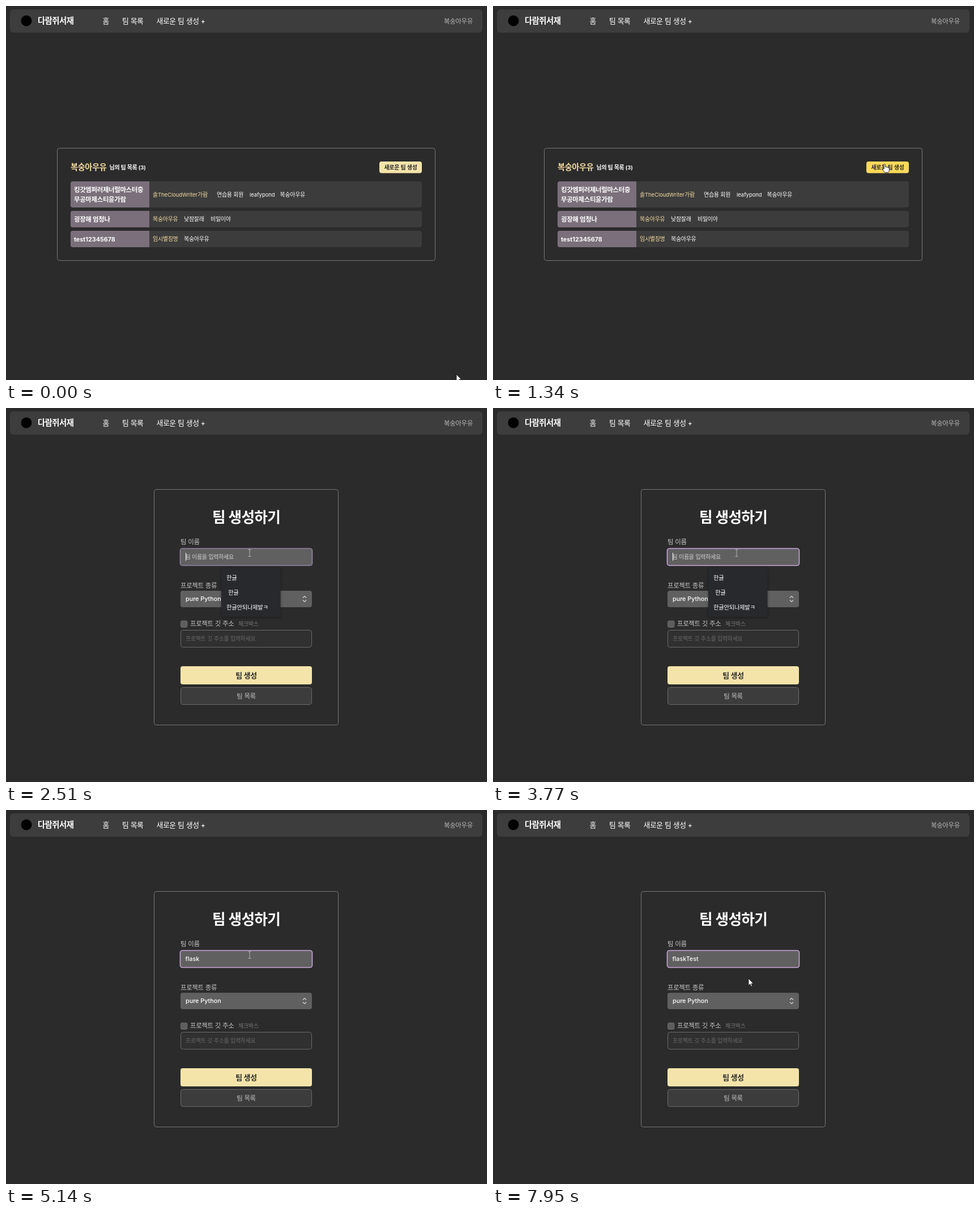
These frames come from a looping animation (849 by 659 pixels, 8 s). An HTML page:

```html
<!DOCTYPE html>
<html lang="ko">
<head>
<meta charset="utf-8">
<title>팀 생성</title>
<style>
  html, body { margin: 0; width: 100%; height: 100%; overflow: hidden; background: #2b2b2b; }
  svg { display: block; width: 849px; height: 659px; }
  text { white-space: pre; font-family: Inter, "Noto Sans CJK KR", "Noto Sans CJK", sans-serif; }
  .ko { font-family: "Noto Sans CJK KR", "Noto Sans CJK", sans-serif; letter-spacing: -.03em; }
</style>
</head>
<body>
<svg id="stage" viewBox="0 0 849 659"></svg>
<script>
const LOOP = 8000;
const S = 10.3, M = 11.8, L = 13.25, XL = 14.7;
const BG = '#2b2b2b', GREY = '#3c3c3c', CREAM = '#f5e4a9', GOLD = '#f5dca0', FIELD = '#606060';
const USER = '복숭아우유';

// Hangul and Latin runs have their own optical size.
const runs = (str, size) => str.replace(/[가-힣ㄱ-ㅎ]+|[^가-힣ㄱ-ㅎ]+/g, run =>
  /[가-힣ㄱ-ㅎ]/.test(run)
    ? `<tspan class="ko" font-size="${size * .97}">${run}</tspan>`
    : `<tspan font-size="${size * .915}">${run}</tspan>`);

// cy is the optical middle of the line.
const text = (x, cy, size, str, fill = '#fff', weight = 400, anchor = 'start') =>
  `<text x="${x}" y="${cy + size * .37}" fill="${fill}" font-weight="${weight}" text-anchor="${anchor}">${runs(str, size)}</text>`;

const box = (x, y, w, h, fill, extra = '') =>
  `<rect x="${x}" y="${y}" width="${w}" height="${h}" rx="4" fill="${fill}" ${extra}/>`;

const teamRow = (y, h, lines, members) =>
  box(114, y, 620, h, GREY) +
  `<path fill="#7a6f7b" d="M253 ${y}H118a4 4 0 0 0-4 4v${h - 8}a4 4 0 0 0 4 4H253z"/>` +
  lines.map((line, i) => text(120, y + h / 2 + (i - (lines.length - 1) / 2) * 17, M, line, '#fff', 700)).join('') +
  members.map(([x, name], i) => text(x, y + h / 2, S, name, i ? '#fff' : GOLD)).join('');

const header =
  box(7, 6, 834, 41, '#3d3d3d', 'style="rx:6px"') +
  '<circle cx="36" cy="26" r="9.5" fill="#000"/>' +
  text(56, 26, XL, '다람쥐서재', '#fff', 700) +
  text(170.5, 26, L, '홈', '#fff', 500) +
  text(205, 26, L, '팀 목록', '#fff', 500) +
  text(265.5, 26, L, '새로운 팀 생성 +', '#fff', 500) +
  text(773, 26.5, M, USER, '#b8b8b8');

const home =
  box(90.5, 250.5, 667, 198, 'none', 'stroke="#777"') +
  text(114, 284, XL, USER, GOLD, 700) +
  text(182.5, 284.5, S, '님의 팀 목록 (3)', '#fff', 700) +
  box(659, 274, 75, 20.5, CREAM, 'id="create"') +
  text(696.5, 284.5, S, '새로운 팀 생성', BG, 600, 'middle') +
  teamRow(309, 46, ['킹갓엠퍼러제너럴마스터충', '무공마제스티윤가람'],
    [[259, '솔TheCloudWriter가람'], [372, '연습용 회원'], [430, 'leafypond'], [483.5, USER]]) +
  teamRow(361, 29, ['굉장해 엄청나'], [[259, USER], [314, '낮잠잘래'], [361, '비밀이야']]) +
  teamRow(396, 29, ['test12345678'], [[259, '임시별칭명'], [314, USER]]);

const form =
  box(261.5, 143.5, 325, 415, 'none', 'stroke="#777"') +
  text(424, 192.5, 26.5, '팀 생성하기', '#fff', 700, 'middle') +
  text(308, 236, M, '팀 이름', '#c8c8c8') +
  box(308, 248, 232, 29, FIELD) +
  box(307.5, 247.5, 233, 30, 'none', 'id="ring" stroke-width="1.6"') +
  `<g id="hint">${text(316.5, 262.5, S, '팀 이름을 입력하세요', '#d2d2d2')}</g>` +
  `<text id="typed" x="316.5" y="266.3" fill="#fff" font-size="${M * .915}" font-weight="500"></text>` +
  '<rect id="caret" y="255" width="1" height="14" fill="#fff"/>' +
  text(308, 312.5, M, '프로젝트 종류', '#c8c8c8') +
  box(308, 322, 232, 29, FIELD) +
  text(317, 336, M, 'pure Python', '#fff', 500) +
  '<path d="M524 334.5l3-3 3 3M524 338.5l3 3 3-3" fill="none" stroke="#ddd" stroke-width="1.1"/>' +
  '<rect x="308.5" y="375" width="11.5" height="11.5" rx="2.5" fill="#5e5e5e" stroke="#747474" stroke-width=".8"/>' +
  text(325, 379.5, M, '프로젝트 깃 주소', '#c8c8c8') +
  text(410, 380, S, '체크박스', '#777') +
  box(308.5, 391.5, 231, 30, '#303030', 'stroke="#6b6b6b"') +
  text(317, 406.5, S, '프로젝트 깃 주소를 입력하세요', '#696969') +
  box(308, 455, 232, 32, CREAM) +
  text(424, 471, L, '팀 생성', BG, 600, 'middle') +
  box(308.5, 492.5, 231, 30, GREY, 'stroke="#6b6b6b"') +
  text(424, 507.5, M, '팀 목록', '#c0c0c0', 400, 'middle') +
  '<g id="popup"><path d="M391 283l5-5 5 5z" fill="#28292d"/>' +
  '<rect x="380" y="282" width="104.5" height="86" rx="2" fill="#28292d" style="filter:drop-shadow(0 1px 2px #0006)"/>' +
  text(389, 299, 10.7, '한글') + text(392, 325, 10.7, '한글') + text(389, 351, 10.7, '한글안되나제발ㅋ') + '</g>';

const cursors =
  '<g id="cursor">' +
  '<path id="arrow" d="M0 0V12.2L2.8 9.6 4.6 13.8 6.6 12.9 4.8 8.9H8.6z" fill="#fff" stroke="#111" stroke-width=".8"/>' +
  '<path id="hand" d="M-1.2 .8Q0-1 1.3.8V5.2Q2.6 4.3 3.6 5.6 5 4.8 6 6.2 7.8 5.8 8 7.6V11Q7.6 13 6.4 14.8H.2Q-1.6 12-4 9.2-3.6 7-1.2 8.8z" fill="#fff" stroke="#111" stroke-width=".9"/>' +
  '<path id="beam" d="M-2.5-5.5H2.5M0-5.5V6.5M-2.5 6.5H2.5" fill="none" stroke="#b0b0b0"/>' +
  '</g>';

const stage = document.getElementById('stage');
stage.innerHTML = header + `<g id="home">${home}</g><g id="form">${form}</g>` + cursors;
const el = Object.fromEntries([...stage.querySelectorAll('[id]')].map(n => [n.id, n]));
const show = (node, on) => node.setAttribute('visibility', on ? 'inherit' : 'hidden');

const OPEN = 1430, FOCUS = 2510;

// Stepped pointer moves: start, step count, end x, end y, sideways bow.
const moves = [
  [80, 1, 690, 601, 0], [340, 9, 690, 282, -42], [1160, 3, 692, 277, 0],
  [OPEN, 1, 684, 323, 0], [1520, 2, 589, 416, 0], [1790, 6, 430, 255, 0],
  [7850, 1, 434, 248, 0], [7950, 1, 451, 297, 0]
];

const edits = [
  [FOCUS, ''], [3860, 'f'], [3950, 'fl'], [4230, 'fla'], [4490, 'flas'], [4590, 'flask'],
  [5400, 'flaskt'], [5580, 'flaskte'], [6020, 'flaskt'], [6110, 'flask'],
  [6380, 'flaskT'], [6480, 'flaskTE'], [6930, 'flaskT'], [7020, 'flaskTe'],
  [7300, 'flaskTes'], [7390, 'flaskTest']
];

function pointer(t) {
  let x = 795, y = 649;
  for (const [start, steps, toX, toY, bow] of moves) {
    if (t < start) break;
    const p = Math.min(1, (Math.floor((t - start) / 91) + 1) / steps);
    x += (toX - x) * p + bow * Math.sin(Math.PI * p);
    y += (toY - y) * p;
  }
  return [x, y];
}

function render(t) {
  const onForm = t >= OPEN, focused = t >= FOCUS;
  const [x, y] = pointer(t);
  const hover = !onForm && x > 659 && x < 734 && y > 274 && y < 294.5;
  const beam = onForm && x > 308 && x < 540 && y >= 248 && y < 277;

  show(el.home, !onForm);
  show(el.form, onForm);
  el.create.setAttribute('fill', hover ? '#ffd95a' : CREAM);
  show(el.arrow, !hover && !beam);
  show(el.hand, hover);
  show(el.beam, beam);
  el.cursor.setAttribute('transform', `translate(${x} ${y})`);

  const [since, value] = edits.findLast(([at]) => at <= t) || edits[0];
  if (el.typed.textContent !== value) el.typed.textContent = value;
  const blinkOn = focused && (t - since) % 1000 < 500;
  el.caret.setAttribute('x', Math.round(317 + (value ? el.typed.getComputedTextLength() : 0)));
  el.caret.setAttribute('visibility', blinkOn ? 'inherit' : 'hidden');
  show(el.hint, !value);
  show(el.popup, focused && !value);
  el.ring.setAttribute('stroke', !focused ? 'none' : t < 2600 ? '#9484a2' : '#cba6dc');
}

function frame() {
  render(performance.now() % LOOP);
  requestAnimationFrame(frame);
}
frame();
</script>
</body>
</html>
```
